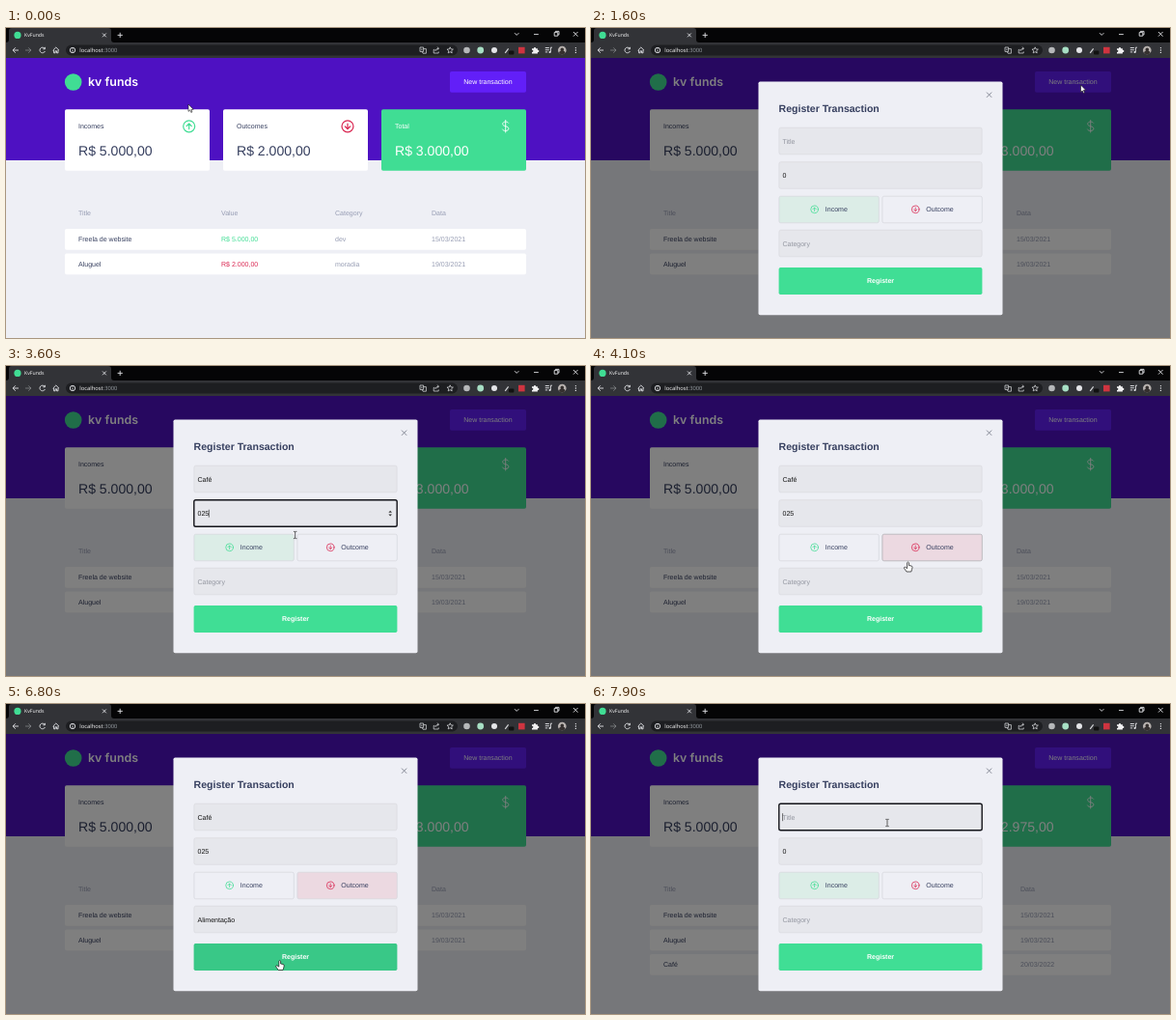
These frames come from a looping animation (600x321 px, 8 s). An HTML page:

```html
<!DOCTYPE html>
<html lang="en">
<head>
<meta charset="utf-8">
<title>KvFunds</title>
<style>
html, body { margin: 0; width: 100%; height: 100%; overflow: hidden; background: #eeeff5; }
svg { display: block; width: 600px; height: 321px; }
text { font: 7.03px "Liberation Sans", Arial, sans-serif; fill: #363f5f; text-rendering: geometricPrecision; white-space: pre; }
.chrome text { font: 5.8px "Open Sans", sans-serif; fill: #fff; }
.chrome .tab { font-size: 5.2px; }
.chrome .dim { fill: #9aa0a6; }
.line { fill: none; stroke: #e4e5e8; stroke-width: .9; }
.brand { font: 600 12.4px Inter, sans-serif; fill: #fff; }
.amount { font-size: 14.05px; }
.white { fill: #fff; }
.muted { fill: #969cb3; }
.income { fill: #40dd94; color: #40dd94; }
.outcome { fill: #d92550; color: #d92550; }
.icon { fill: none; stroke: currentColor; stroke-width: 1.2; stroke-linecap: round; stroke-linejoin: round; }
.heading { font-size: 10.54px; font-weight: bold; }
.bold { font-weight: bold; fill: #fff; text-anchor: middle; }
.box { fill: #e6e7ec; stroke: #d5d6db; stroke-width: .6; }
.ring { fill: none; stroke: #14151b; stroke-width: 1.4; }
.typed { fill: #111; }
.hint { fill: #92959f; }
</style>
</head>
<body>
<svg viewBox="0 0 600 321">
  <defs>
    <g id="up" class="icon"><circle r="6"/><path d="M0 2.8V-2.7M-2.6-.2 0-2.8 2.6-.2"/></g>
    <g id="down" class="icon"><circle r="6"/><path d="M0-2.8V2.7M-2.6 .2 0 2.8 2.6 .2"/></g>
  </defs>

  <g id="page">
    <rect y="31" width="600" height="290" fill="#eeeff5"/>
    <rect y="31" width="600" height="106" fill="#4e11c2"/>
    <circle cx="69.7" cy="56" r="8.8" fill="#40dd94"/>
    <text class="brand" x="85" y="60">kv funds</text>
    <rect id="newButton" x="460" y="45" width="79" height="21.7" rx="1.8"/>
    <text class="white" x="474.3" y="58.3">New transaction</text>

    <g fill="#fff">
      <rect x="61" y="84.2" width="150" height="63.5" rx="1.8"/>
      <rect x="225" y="84.2" width="150" height="63.5" rx="1.8"/>
      <rect x="389" y="84.2" width="150" height="63.5" rx="1.8" fill="#40dd94"/>
    </g>
    <text x="75" y="104">Incomes</text>
    <text x="239" y="104">Outcomes</text>
    <text class="white" x="403" y="104">Total</text>
    <text class="amount" x="75" y="131.6">R$ 5.000,00</text>
    <text class="amount" id="spent" x="239" y="131.6"></text>
    <text class="amount white" id="total" x="403" y="131.6"></text>
    <use href="#up" class="income" x="189.7" y="101.8"/>
    <use href="#down" class="outcome" x="354" y="101.8"/>
    <path class="icon" color="#fff" style="stroke-width:.9" transform="translate(517.7 101.8)"
      d="M0-6.3V6.3M2.9-3.6C2.3-4.4 1.2-4.7 0-4.7C-1.8-4.7-3-3.7-3-2.4C-3 .6 3.2-.6 3.2 2.4C3.2 3.8 1.8 4.7 0 4.7C-1.5 4.7-2.7 4.2-3.2 3.2"/>
    <g id="tableBefore"></g>
    <g id="tableAfter"></g>
  </g>

  <g id="modal">
    <rect y="31" width="600" height="290" opacity=".5"/>
    <rect x="173.5" y="55.5" width="253" height="241.7" rx="1.8" fill="#eeeff5"/>
    <path d="M410 66.6l5.2 5.2M415.2 66.6l-5.2 5.2" stroke="#868a96" stroke-width="1"/>
    <text class="heading" x="194.6" y="86.7">Register Transaction</text>
    <g id="fields"></g>
    <path id="spinner" d="M396.4 151.8l1.8-2.1 1.8 2.1zM396.4 153.5l1.8 2.1 1.8-2.1z" fill="#333"/>
    <rect id="incomeBox" x="194.9" y="174.2" width="103.4" height="27.6" rx="1.8" stroke-width=".7" stroke="#d5d6db"/>
    <rect id="outcomeBox" x="301.9" y="174.2" width="103.4" height="27.6" rx="1.8" stroke-width=".7"/>
    <use href="#up" class="income" transform="translate(231.6 187.8) scale(.64)"/>
    <use href="#down" class="outcome" transform="translate(336.2 187.8) scale(.64)"/>
    <text x="242.8" y="190.3">Income</text>
    <text x="347.3" y="190.3">Outcome</text>
    <rect id="register" x="194.6" y="248" width="210.8" height="28" rx="1.8"/>
    <text class="bold" x="300" y="264.3">Register</text>
  </g>

  <g class="chrome">
    <rect width="600" height="31" fill="#050506"/>
    <path d="M0 15Q3 15 3 12V3Q3 0 6 0H106Q109 0 109 3V12Q109 15 112 15H600V31H0Z" fill="#323337"/>
    <circle cx="12" cy="7.4" r="3.6" fill="#40dd94"/>
    <text class="tab" x="19" y="9.4">KvFunds</text>
    <path class="line" d="M100 5.5l3.8 3.8M103.8 5.5l-3.8 3.8M115.6 7.4h5.2M118.2 4.8v5.2"/>
    <path class="line" d="M527 5.2l2.2 2.2 2.2-2.2M547 6.6h4.8M568.2 4.6h3.6v3.6h-3.6zM569.4 4.4v-1h3.6v3.6h-1M588 4l4.6 4.6M592.6 4l-4.6 4.6"/>
    <rect x="62" y="17.6" width="406" height="10.8" rx="5.4" fill="#1d1e21"/>
    <path class="line" d="M13 23H7.2M9.8 20.3 7.1 23l2.7 2.7"/>
    <path class="line" d="M20 23h5.8M23.2 20.3l2.7 2.7-2.7 2.7" stroke-opacity=".4"/>
    <path class="line" d="M40 21.2A2.8 2.8 0 1 0 40.4 24M40.4 19.8v2h-2"/>
    <path class="line" d="M48.6 23.2 51.8 20l3.2 3.2M49.6 22.8v3h1.5v-2h1.4v2H54v-3"/>
    <path class="line" d="M69 22.6v2M69 21v.7"/><circle class="line" cx="69" cy="23" r="2.7"/>
    <text x="76.3" y="25.1">localhost<tspan class="dim">:3000</tspan></text>
    <g class="line" style="stroke-width:.7">
      <path d="M429 20h3.6v4.4H429zM432.6 21.6h2.8v4.6h-3.4l-.8-1.8M430 22.2h1.6"/>
      <path d="M444.4 22.4h-1.2v3.6h5v-1.6M444.8 24q.4-2.6 3.4-2.8M446.8 19.7l1.8 1.5-1.8 1.5"/>
      <path d="M460.2 19.8l.9 2.1 2.3.2-1.7 1.5.5 2.3-2-1.2-2 1.2.5-2.3-1.7-1.5 2.3-.2z"/>
    </g>
    <circle cx="477.5" cy="23" r="3.3" fill="#b6b8ba"/>
    <circle cx="491.7" cy="23" r="3.4" fill="#a7dfc4"/>
    <circle cx="506" cy="23" r="3" fill="#e4e5e8"/>
    <path d="M517.2 25.8l3.4-4.4" stroke="#d5d6d8" stroke-width="1.2"/>
    <rect x="521" y="23.6" width="5.4" height="4" rx="1" fill="#111"/>
    <rect x="531" y="19.8" width="6.6" height="6.6" fill="#cf3440"/>
    <path d="M545 21.2h1.9a1.1 1.1 0 1 1 2.2 0h1.8v1.7a1.1 1.1 0 1 1 0 2.1v1.4H545v-1.6a1 1 0 1 0 0-1.9z" fill="#f1f1f2"/>
    <path class="line" d="M558.8 20.5h4M558.8 22.7h4M558.8 24.9h2.4M566 20.2h-1.6v4.6"/>
    <circle cx="563.6" cy="25" r="1.1" fill="#e4e5e8"/>
    <circle cx="576.3" cy="23" r="4.3" fill="#b9b3b0"/>
    <path d="M573 25.8q.4-2 2-2.2a1.8 1.8 0 1 1 2.6 0q1.6.2 2 2.2a4.3 4.3 0 0 1-6.6 0" fill="#35302f"/>
    <g fill="#e4e5e8"><circle cx="590.4" cy="20.6" r=".7"/><circle cx="590.4" cy="23" r=".7"/><circle cx="590.4" cy="25.4" r=".7"/></g>
  </g>

  <g id="cursor">
    <path id="arrow" d="M0 0V7.4L1.7 5.9 2.8 8.4 4 7.9 2.9 5.4 5.2 5.3z" fill="#fff" stroke="#111" stroke-width=".6"/>
    <path id="hand" d="M-.9 .7Q0-.6 .9 .7V3.5L3.5 4Q4.6 4.2 4.5 5.5L4.1 7.4 3.3 10H-1.5L-4 6.4Q-4.2 5.2-3 5.2L-.9 6.6z" fill="#fff" stroke="#111" stroke-width=".7" stroke-linejoin="round"/>
    <path id="beam" d="M-1.7-3.6H-.5L0-3.2 .5-3.6H1.7M0-3.2V3.2M-1.7 3.6H-.5L0 3.2 .5 3.6H1.7" fill="none" stroke="#222" stroke-width=".7"/>
  </g>
</svg>
<script>
const LOOP = 8000, STEP = 100;
const OPEN = 1600, SAVED = 7000, REOPEN = 7600;
const $ = id => document.getElementById(id);
const show = (el, on) => el.setAttribute("visibility", on ? "inherit" : "hidden");
const fill = (id, color) => $(id).setAttribute("fill", color);
const clamp = v => Math.max(0, Math.min(1, v));

const text = (x, y, cls, value) => `<text x="${x}" y="${y}" class="${cls}">${value}</text>`;

function table(columns, rows) {
  const head = ["Title", "Value", "Category", "Data"];
  return head.map((h, i) => text(columns[i], 194, "muted", h)).join("") +
    rows.map(([title, value, category, date, kind], r) => {
      const top = 208 + r * 25.5, classes = ["", kind, "muted", "muted"];
      return `<rect x="61" y="${top}" width="478" height="21.8" rx="1.8" fill="#fff"/>` +
        [title, value, category, date].map((c, i) => text(columns[i], top + 13.3, classes[i], c)).join("");
    }).join("");
}

const rows = [
  ["Freela de website", "R$ 5.000,00", "dev", "15/03/2021", "income"],
  ["Aluguel", "R$ 2.000,00", "moradia", "19/03/2021", "outcome"],
  ["Café", "R$ 25,00", "Alimentação", "20/03/2022", "outcome"]
];
$("tableBefore").innerHTML = table([75, 223, 341, 441], rows.slice(0, 2));
$("tableAfter").innerHTML = table([75, 218, 331, 445], rows);

// Each field: typing start, time per key, and the span in which it has focus
const fields = [
  { hint: "Title", y: 103.2, base: "", keys: "Café", start: 2000, rate: 100, focus: [1900, 2600] },
  { hint: "", y: 138.7, base: "0", keys: "25", start: 2900, rate: 200, focus: [2600, 3900] },
  { hint: "Category", y: 209.2, base: "", keys: "Alimentação", start: 4700, rate: 100, focus: [4400, 6200] }
];
for (const f of fields) {
  const g = document.createElementNS("http://www.w3.org/2000/svg", "g");
  g.innerHTML = `<rect class="box" x="194.9" y="${f.y}" width="210.2" height="27.6" rx="1.8"/>
    <rect class="ring" x="194.8" y="${f.y}" width="210.4" height="27.6" rx="1.8"/>
    ${text(198.5, f.y + 16.4, "typed", "")}
    <path d="M0 ${f.y + 10}v8" stroke="#111" stroke-width=".6"/>`;
  $("fields").append(g);
  [, f.ring, f.label, f.caret] = g.children;
}

function drawField(f, t, again) {
  const count = again ? 0 : Math.floor((t - f.start) / f.rate) + 1;
  const value = f.base + f.keys.slice(0, Math.max(0, count));
  const focused = again ? f === fields[0] && t >= 7800 : t >= f.focus[0] && t < f.focus[1];
  f.label.textContent = value || f.hint;
  f.label.setAttribute("class", value ? "typed" : "hint");
  const width = value ? f.label.getComputedTextLength() : 0;
  f.caret.setAttribute("transform", `translate(${198.6 + width} 0)`);
  show(f.ring, focused);
  show(f.caret, focused);
  return focused;
}

// time, x, y, pointer shape from then on
const path = [
  [0, 189, 79, "arrow"], [100, 189, 79, "arrow"], [500, 290, 112, "arrow"], [900, 425, 100, "arrow"],
  [1200, 500, 62, "hand"], [1400, 507.5, 59, "hand"], [1600, 507.5, 59, "arrow"],
  [1800, 330, 112, "beam"], [1900, 282, 118, "beam"], [2300, 280, 119, "beam"],
  [2600, 259, 155, "beam"], [3400, 259, 155, "beam"], [3700, 320, 185, "hand"],
  [3900, 329, 200, "hand"], [4100, 328.5, 203, "hand"], [4200, 312, 215, "beam"],
  [4400, 285, 223, "beam"], [5800, 285, 223, "beam"], [6000, 284, 252, "hand"],
  [6200, 283.7, 265.5, "hand"], [6900, 283.7, 265.5, "hand"], [7000, 300, 246, "arrow"],
  [7200, 395, 145, "arrow"], [7400, 475.5, 62, "hand"], [7600, 475.5, 62, "arrow"],
  [7700, 400, 92, "arrow"], [7800, 335, 116, "beam"], [7900, 307, 123, "beam"], [8000, 307, 123, "beam"]
];

function drawCursor(t) {
  const i = path.findIndex((p, k) => t >= p[0] && t < path[k + 1][0]);
  const [t0, x0, y0, shape] = path[i], [t1, x1, y1] = path[i + 1];
  const u = (t - t0) / (t1 - t0);
  $("cursor").setAttribute("transform", `translate(${x0 + (x1 - x0) * u} ${y0 + (y1 - y0) * u})`);
  for (const s of ["arrow", "hand", "beam"]) show($(s), s === shape);
}

function draw(now) {
  const t = Math.floor((now % LOOP) / STEP) * STEP;
  const saved = t >= SAVED, again = t >= REOPEN;
  show($("modal"), again || (t >= OPEN && !saved));
  show($("tableBefore"), !saved);
  show($("tableAfter"), saved);
  $("spent").textContent = saved ? "R$ 2.025,00" : "R$ 2.000,00";
  $("total").textContent = saved ? "R$ 2.975,00" : "R$ 3.000,00";

  const hovering = (t >= 1200 && t < OPEN) || (t > 7400 && t < REOPEN);
  fill("newButton", hovering ? "#581be0" : "#621ff8");

  const focus = fields.map(f => drawField(f, t, again));
  show($("spinner"), focus[1]);
  const outcome = t >= 3900 && !again;
  fill("incomeBox", outcome ? "#eeeff5" : "#dcede7");
  fill("outcomeBox", outcome ? "#ecd9e1" : "#eeeff5");
  $("outcomeBox").setAttribute("stroke", t >= 3700 && t < 4200 ? "#a9a9ae" : "#d5d6db");
  const dim = again ? 0 : clamp((t - 5900) / 200);
  fill("register", `rgb(${64 - 7 * dim}, ${222 - 22 * dim}, ${149 - 14 * dim})`);
  drawCursor(t);
}

function tick(now) {
  draw(now);
  requestAnimationFrame(tick);
}
draw(0);
requestAnimationFrame(tick);
</script>
</body>
</html>
```
